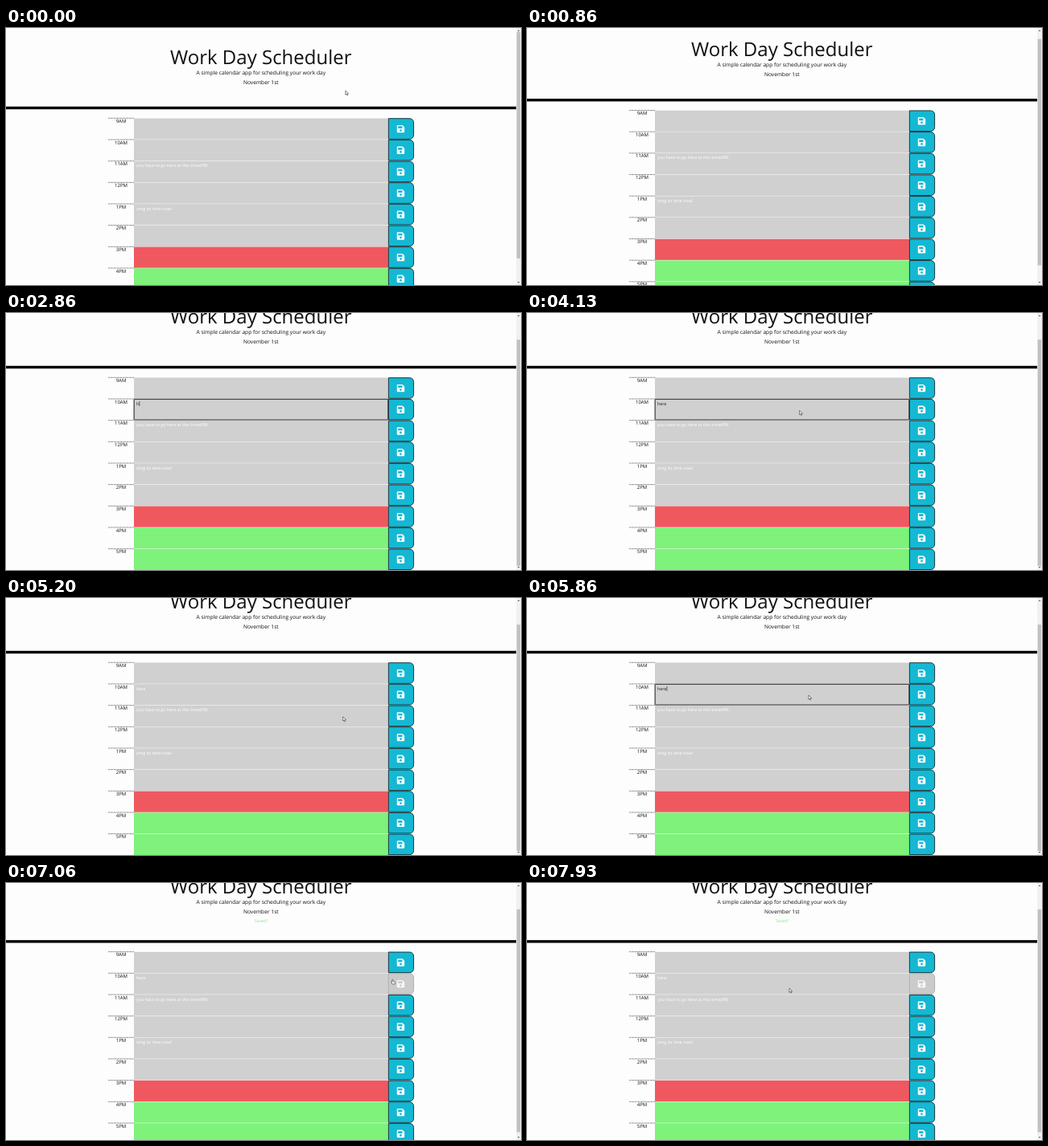
Animation of 640x320 px, one loop 8000 ms. Source, as an HTML page:

```html
<!DOCTYPE html>
<html lang="en">
<head>
<meta charset="utf-8">
<title>Work Day Scheduler</title>
<style>
html, body { margin: 0; width: 100%; height: 100%; overflow: hidden; background: #fdfdfd; }
svg { display: block; width: 640px; height: 320px; }
text { font-family: "Open Sans", "Noto Sans", sans-serif; fill: #111; text-rendering: geometricPrecision; white-space: pre; }
.mid { text-anchor: middle; }
</style>
</head>
<body>
<svg id="stage" viewBox="0 0 640 320"></svg>
<script>
const LOOP = 8000, ROW = 80 / 3, TOP = 112, ACTIVE = 1;
const GREY = '#d0d0d0', RED = '#f05860', GREEN = '#7ef27a', BLUE = '#14b8d3';
const BUTTON = 'M475.4 .7H501.6a5 5 0 0 1 5 5V21.3a5 5 0 0 1-5 5H475.4Z';
const DISK = 'M-3.7-4.7H2.2L4.7-2.2V3.7a1 1 0 0 1-1 1H-3.7a1 1 0 0 1-1-1V-3.7a1 1 0 0 1 1-1Z' +
  'M-3.3-3.3V-.6H2V-3.3ZM-1.4 2a1.4 1.4 0 1 0 2.8 0a1.4 1.4 0 1 0-2.8 0Z';
const ARROW = 'M0 0V5.2L1.2 4.1L2 6L2.9 5.6L2.1 3.8H3.7Z';
const HAND = 'M1.2 0Q1.9 0 1.9.8V2.4L4 3Q4.6 3.2 4.5 4L4.1 6H1.4L-.3 3.6Q-.1 3 .6 3.5V.8Q.6 0 1.2 0Z';

const stage = document.getElementById('stage');
function set(el, attrs) {
  for (const key in attrs) el.setAttribute(key, attrs[key]);
  return el;
}
function add(parent, tag, attrs, text = '') {
  const el = set(document.createElementNS('http://www.w3.org/2000/svg', tag), attrs);
  el.textContent = text;
  return parent.appendChild(el);
}
const rect = (parent, x, y, width, height, fill) => add(parent, 'rect', { x, y, width, height, fill });
const label = (parent, x, y, size, text, attrs = {}) =>
  add(parent, 'text', { x, y, 'font-size': size, ...attrs }, text);
const centred = (parent, x, y, size, text, attrs) =>
  label(parent, x, y, size, text, { class: 'mid', ...attrs });
const show = (el, on) => set(el, { visibility: on ? 'visible' : 'hidden' });

// Header
const page = add(stage, 'g', {});
centred(page, 316.8, 44.8, 24, 'Work Day Scheduler');
centred(page, 316.8, 58, 20 / 3, 'A simple calendar app for scheduling your work day');
centred(page, 316.8, 70, 20 / 3, 'November 1st');
const saved = centred(page, 316.8, 81.2, 16 / 3, 'Saved!', { style: 'fill:#8eea90' });

// Schedule
const body = add(page, 'g', {});
rect(body, 0, 97.8, 634, 3.4, '#000');
const notes = { 2: 'you have to go here at this timedffd', 4: 'omg its time now!' };
const hours = ['9AM', '10AM', '11AM', '12PM', '1PM', '2PM', '3PM', '4PM', '5PM'];
const rows = hours.map((hour, i) => {
  const g = add(body, 'g', { transform: `translate(0 ${TOP + i * ROW})` });
  rect(g, 159, 0.5, 316, ROW - 0.5, i < 6 ? GREY : i === 6 ? RED : GREEN);
  add(g, 'path', { d: 'M127 .3H159', stroke: '#000', 'stroke-width': 0.5, 'stroke-dasharray': '1 .35' });
  centred(g, 143, 5.9, 6, hour);
  const note = label(g, 162, 7.9, 16 / 3, notes[i] || '', { style: 'fill:#fff' });
  const button = add(g, 'path', { d: BUTTON, fill: BLUE, stroke: '#10272c', 'stroke-width': 0.9 });
  const disk = add(g, 'path', { d: DISK, fill: '#fff', 'fill-rule': 'evenodd' });
  return { g, note, button, disk };
});
const active = rows[ACTIVE];
const outline = add(active.g, 'rect', {
  x: 159.1, y: 0.6, width: 315.8, height: 25.8, rx: 0.6, fill: 'none', stroke: '#1c1c1c', 'stroke-width': 1
});
const caret = rect(active.g, 162, 3.2, 0.6, 6, '#111');

// Scrollbar
rect(stage, 634, 0, 6, 320, '#f1f1f1');
add(stage, 'path', { d: 'M635.6 4L637 2.4L638.4 4ZM635.6 316L637 317.6L638.4 316Z', fill: '#505050' });
const thumb = rect(stage, 634.7, 5, 4.3, 282, '#c1c1c1');
const pointer = add(stage, 'path', { fill: '#fff', stroke: '#333', 'stroke-width': 0.6, 'stroke-linejoin': 'round' });

// Keys: [time, value, ...]
const scrollKeys = [[790, 0], [860, 9.6], [930, 23], [1000, 32]];
const mouseKeys = [
  [0, 422, 78], [300, 395, 66], [800, 336, 50], [1000, 329, 46], [1350, 300, 76], [1730, 246, 116],
  [1930, 236, 119], [3800, 236, 119], [4200, 360, 122], [4500, 466, 138], [4750, 450, 150],
  [5200, 419, 148], [5460, 366, 126], [5650, 350, 121], [6000, 350, 121], [6400, 450, 119],
  [6580, 489, 119], [7000, 489, 119], [7300, 440, 124], [7600, 360, 130], [7930, 326, 131], [8000, 325, 131]
];
const typing = [[2860, 'h'], [3400, 'he'], [3540, 'her'], [3670, 'here']];

function sample(keys, t) {
  const i = keys.findIndex(key => key[0] > t);
  if (i < 0) return keys[keys.length - 1].slice(1);
  if (i === 0) return keys[0].slice(1);
  const a = keys[i - 1], b = keys[i], k = (t - a[0]) / (b[0] - a[0]);
  return a.slice(1).map((v, j) => v + (b[j + 1] - v) * k);
}
const within = (t, from, to) => t >= from && t < to;

function draw(t) {
  const [scroll] = sample(scrollKeys, t), [x, y] = sample(mouseKeys, t);
  const done = t >= 7000, shift = done ? 16 / 3 : 0;
  set(page, { transform: `translate(0 ${-scroll})` });
  set(body, { transform: `translate(0 ${shift})` });
  show(saved, done);

  const focused = within(t, 2400, 4700) || within(t, 5700, 7000);
  const text = typing.reduce((now, [start, value]) => t >= start ? value : now, '');
  active.note.textContent = text;
  active.note.style.fill = focused ? '#222' : '#fff';
  show(outline, focused);
  const blink = within(t, 2400, 2600) || within(t, 2860, 4100) || within(t, 5700, 6200);
  show(caret, focused && blink);
  set(caret, { x: 162.3 + (text ? active.note.getComputedTextLength() : 0) });
  set(active.button, { fill: done ? '#cbcbcb' : BLUE, stroke: done ? '#aaa' : '#10272c' });

  const hovered = x > 475 && x < 507 ? Math.floor((y + scroll - shift - TOP) / ROW) : -1;
  rows.forEach(({ disk }, i) => {
    const grow = i === hovered && !done ? 1.42 : 1;
    set(disk, { transform: `translate(490.5 13.6) scale(${grow})`, opacity: done && i === ACTIVE ? 0.85 : 1 });
  });

  const height = 352 + shift;
  set(thumb, { y: 5 + scroll * 310 / height, height: 310 * 320 / height });
  show(pointer, !within(t, 830, 930) && !within(t, 2600, 3800));
  set(pointer, { d: hovered < 0 ? ARROW : HAND, transform: `translate(${x} ${y})` });
}

function tick() {
  draw(performance.now() % LOOP);
  requestAnimationFrame(tick);
}
tick();
</script>
</body>
</html>
```
